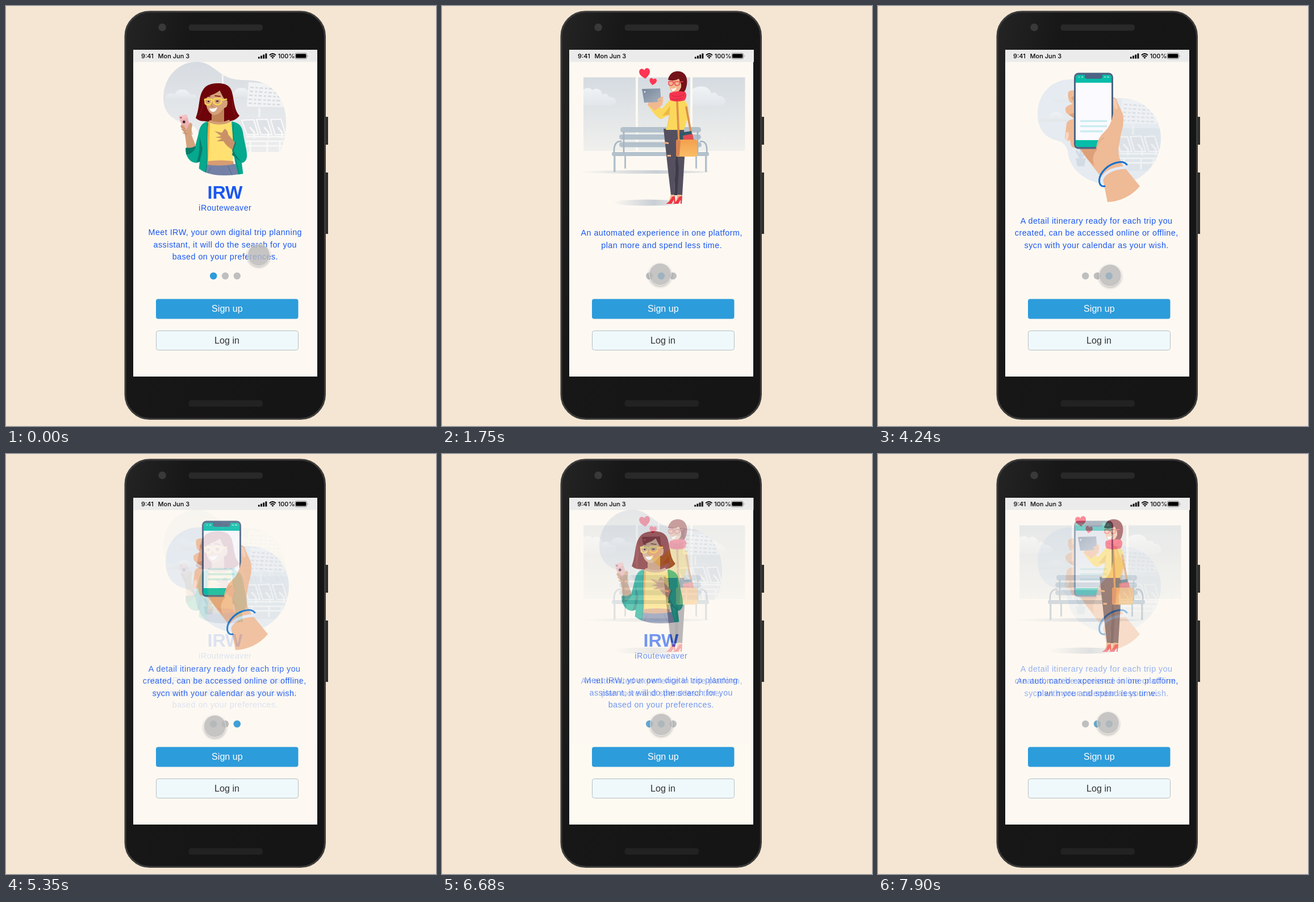
Recreate the animation shown at these times as an HTML page. Size 757x739 px, loop 8000 ms.

```html
<!DOCTYPE html>
<html lang="en">
<head>
<meta charset="utf-8">
<title>Trip planner onboarding</title>
<style>
html, body { margin: 0; width: 100%; height: 100%; overflow: hidden; background: #f5e6d3 }
svg { display: block; width: 757px; height: 739px }
text { font-family: "Liberation Sans", Arial, sans-serif; text-anchor: middle }
.copy { font-size: 14.33px; letter-spacing: .457px; fill: #1a56f0 }
.btn { font-size: 16.1px }
.bar text { font: 500 11px Inter, sans-serif; text-anchor: start }
.line { fill: none; stroke-linecap: round; stroke-linejoin: round }
#cursor { opacity: .8 }
</style>
</head>
<body>
<svg viewBox="0 0 757 739">
<defs>
  <linearGradient id="body" x2="1" y2=".35"><stop stop-color="#242424"/><stop offset=".3" stop-color="#171717"/><stop offset="1" stop-color="#151515"/></linearGradient>
  <linearGradient id="sky" x2="0" y2="1"><stop stop-color="#d6dbe1"/><stop offset=".75" stop-color="#e9ebed"/><stop offset="1" stop-color="#fbf9f3"/></linearGradient>
  <linearGradient id="pane" x2="0" y2="1"><stop stop-color="#d5dbe1"/><stop offset="1" stop-color="#f0f0ed"/></linearGradient>
  <linearGradient id="cloud" x2="0" y2="1"><stop stop-color="#f0f3f5"/><stop offset="1" stop-color="#e2e6ea"/></linearGradient>
  <linearGradient id="floor"><stop stop-color="#c9cfd5" stop-opacity="0"/><stop offset=".6" stop-color="#c9cfd5"/><stop offset="1" stop-color="#c9cfd5" stop-opacity=".3"/></linearGradient>
  <linearGradient id="tablet" x2="1" y2="1"><stop stop-color="#76879a"/><stop offset="1" stop-color="#a5b1be"/></linearGradient>
  <linearGradient id="bag" x2="0" y2="1"><stop stop-color="#f2a04e"/><stop offset="1" stop-color="#fbbd66"/></linearGradient>
  <clipPath id="blobA"><path d="M277 163C277 125 303 99 335 98C362 98 369 118 395 127C412 132 425 129 441 132C475 139 493 170 493 204C493 228 488 246 482 257H345C341 225 337 211 320 206C295 204 277 188 277 163Z"/></clipPath>
  <clipPath id="blobB"><path d="M281 190C281 152 308 129 340 129C372 129 382 166 425 162C470 162 498 195 498 232C498 280 460 315 415 315C370 315 340 290 335 262C333 240 320 238 312 236C293 230 281 215 281 190Z"/></clipPath>
  <clipPath id="bust"><path d="M270 90H500V275C450 290 415 298 382 298C360 298 345 292 335 282L270 262Z"/></clipPath>
  <path id="heart" d="M0 9C-5 5-9 2-9-3C-9-9-2-10 0-5C2-10 9-9 9-3C9 2 5 5 0 9Z" fill="#ff3553"/>
  <g id="puff"><path d="M0 0C0-8 10-12 16-7C20-20 40-18 43-7C50-9 56-5 57 0Z" fill="url(#cloud)"/></g>
  <g id="hall">
    <path d="M427 134L488 139V178L424 177Z" fill="#f2f3f4"/>
    <path class="line" d="M430 143L486 147M429 150L486 154M428 157L486 160M427 164L486 167M427 171L486 174" stroke="#d6dbe0" stroke-width="2.6" stroke-dasharray="6 3.5 4 3" style="stroke-linecap:butt"/>
    <path d="M446 179V196" stroke="#f4f5f6" stroke-width="3"/>
    <g fill="#dfe2e6" stroke="#fafafa" stroke-width="2">
      <path d="M415 201L436 200L444 226H424Z"/><path d="M441 200L460 199L468 226H449Z"/><path d="M466 200L484 199L492 226H474Z"/>
    </g>
    <path class="line" d="M424 230H492M416 238H492M414 246H490M430 214L437 222V232M455 214L462 222V232M479 214L486 222V232M430 238V256M460 238V256M482 238V256" stroke="#f8f8f7" stroke-width="3"/>
  </g>
  <g id="bar" class="bar">
    <rect x="224" y="77" width="324" height="21.5" fill="#ebebeb"/>
    <text x="238" y="91.8">9:41</text><text x="267.5" y="91.8">Mon Jun 3</text><text x="478.7" y="91.8">100%</text>
    <path d="M444 92.500v-3M448.200 92.500v-5M452.400 92.500v-7M456.600 92.500v-9" transform="translate(1.300 0)" stroke="#000" stroke-width="2.800"/>
    <path class="line" d="M463.800 86.500q5.600-5 11.200 0M465.800 89q3.600-3 7.200 0" stroke="#000" stroke-width="1.800" style="stroke-linecap:butt"/>
    <path d="M467.300 90.500q2.100-1.500 4.200 0L469.400 92.700Z"/>
    <rect x="508.700" y="82.900" width="21" height="10" rx="2.600" fill="none" stroke="#777" stroke-width=".8"/>
    <rect x="510" y="84.200" width="18.400" height="7.400" rx="1.500"/><path d="M531 86.500q1.800 1.500 0 3Z" fill="#777"/>
  </g>
  <g id="dots" fill="#bfbfbf"><circle cx="365.200" cy="475" r="6.200"/><circle cx="386" cy="475" r="6.200"/><circle cx="406.800" cy="475" r="6.200"/></g>
  <rect id="paper" x="224" y="77" width="324" height="575" fill="#fdf9f2"/>
</defs>

<rect width="757" height="739" fill="#f5e6d3"/>

<!-- handset -->
<path d="M561 195h6v49h-6ZM561 293h6v108h-6Z" fill="#2d2d2d"/>
<rect x="210" y="10" width="351.500" height="716.500" rx="43" fill="url(#body)" stroke="#3b3b3b" stroke-width="3"/>
<rect x="321.500" y="32.500" width="130.500" height="11" rx="4.500" fill="#292929"/>
<rect x="321.500" y="693.500" width="130.500" height="11.500" rx="4.500" fill="#222"/>
<circle cx="275" cy="37.500" r="6.800" fill="#393939"/>

<!-- welcome -->
<g class="page">
  <use href="#paper"/><use href="#bar"/>
  <g clip-path="url(#blobA)">
    <rect x="270" y="95" width="230" height="165" fill="url(#sky)"/>
    <use href="#puff" x="281" y="163"/><use href="#puff" x="385" y="160"/>
    <path d="M381.500 115V145" stroke="#f3f4f5" stroke-width="3"/>
    <path d="M400 196H495V257H400Z" fill="#e4e7ea" opacity=".6"/>
    <use href="#hall"/>
  </g>
  <g clip-path="url(#bust)">
    <!-- hair, neck -->
    <path d="M334 197C341 180 339 160 346 149C352 138 362 136 374 136C392 136 397 145 399 156C402 172 403 185 411 193C407 198 402 201 397 202L380 207L352 203C347 202 341 204 334 197Z" fill="#6d0409"/>
    <path d="M362 182L384 176V203L394 207L377 216L356 206L362 200Z" fill="#c08358"/>
    <!-- top, midriff, jeans -->
    <path d="M356 204C370 210 384 209 395 204L403 215L399 275H354L352 220Z" fill="#ffe070"/>
    <path d="M356 204Q375 213 395 204L393 200Q376 208 359 201Z" fill="#d39e76"/>
    <path d="M355 273Q377 270 400 273L402 281H353Z" fill="#d79c72"/>
    <path d="M352 279Q378 283 404 278L414 300H345Z" fill="#7381a6"/>
    <path d="M361 284L352 300M391 282L399 300" stroke="#56658d" fill="none"/>
    <path d="M354 205L359 204L356 272L351 280Z" fill="#f3ad45"/>
    <!-- jacket -->
    <path d="M355 203C344 206 341 213 339 224L333 247L317 251C315 262 322 275 334 276L341 274L338 300H351C357 270 351 240 356 206Z" fill="#05a98e"/>
    <path d="M397 203C409 205 415 210 417 222C420 241 425 255 424 266C423 273 418 276 415 276L418 300H410C402 275 400 257 400 240Z" fill="#05a98e"/>
    <path d="M316 250L331 244L334 249C329 258 323 262 317 261ZM341 230L346 252L341 274L335 276C342 260 340 246 341 230Z" fill="#077c6b"/>
    <path d="M400 252L398 262L415 275C407 266 402 260 400 252Z" fill="#077c6b"/>
    <path class="line" d="M355 207C351 240 358 270 350 298M400 209C399 250 405 276 411 297" stroke="#078a76" stroke-width="1.400"/>
    <!-- raised hand with handset -->
    <path d="M304 194L318 191L329 226L316 230Z" fill="#efb2b5"/>
    <path d="M304 194L318 191L320 196L306 201Z" fill="#f4c2c3"/>
    <circle cx="313.300" cy="204" r="2.400" fill="#3e2730"/><circle cx="308" cy="196.500" r="1.500" fill="#a25664"/>
    <path d="M307 211Q310 207 314 211L317 218L324 205Q330 207 327 214L326 225L334 246Q326 251 318 249L315 226Z" fill="#d5a27e"/>
    <path class="line" d="M308 212L315 216M309 217L316 221M311 223L318 225" stroke="#b97f5d"/>
    <!-- folded hand -->
    <path d="M367 220L380 223L385 216Q391 219 391 226L404 241L400 254Q387 246 383 238L371 238L380 233L368 231L379 229Z" fill="#ca9168"/>
    <path d="M404 240L421 251Q426 264 415 263L399 255Z" fill="#05a98e"/>
    <path class="line" d="M404 240L399 255" stroke="#077c6b" stroke-width="2"/>
    <!-- face -->
    <path d="M353 157C359 152 371 154 377 148C385 155 391 164 389 177L382 181C378 188 371 192 366 192C355 189 350 175 353 157Z" fill="#d5a17a"/>
    <path d="M346 174C345 158 350 147 366 143C379 140 391 146 393 165L392 183C387 178 388 167 382 160L376 148C367 158 356 155 351 165Z" fill="#6d0409"/>
    <path d="M383 168Q390 162 390 170Q390 178 384 179Z" fill="#d5a17a"/>
    <path class="line" d="M350 164H362V170Q357 177 351 172ZM366 163H379V170Q373 177 366 171ZM362 166H366M379 166L388 164" stroke="#f6d653" stroke-width="2.600"/>
    <path d="M355 168h3M370 167.500h4" stroke="#341218" stroke-width="2"/>
    <path class="line" d="M352 159L359 159M368 158L377 159" stroke="#6d0409" stroke-width="1.500"/>
    <path d="M358 180Q365 182 372 178Q369 188 363 186Q359 185 358 180Z" fill="#fff"/>
    <path class="line" d="M363 170L361 176L365 177" stroke="#b6784f"/>
    <path class="line" d="M339 193Q348 182 347 160M399 164Q398 187 406 197" stroke="#871920" stroke-width=".9"/>
  </g>
  <text x="385.500" y="339" font-size="32.250" font-weight="700" fill="#1a56f0">IRW</text>
  <g class="copy">
    <text x="385.800" y="360">iRouteweaver</text>
    <text x="385.800" y="403">Meet IRW, your own digital trip planning</text>
    <text x="385.800" y="424.500">assistant, it will do the search for you</text>
    <text x="385.800" y="446">based on your preferences.</text>
  </g>
  <use href="#dots"/><circle cx="365.200" cy="475" r="6.200" fill="#2d9cdb"/>
</g>

<!-- automated -->
<g class="page">
  <use href="#paper"/><use href="#bar" x="1"/>
  <path d="M249 125.500h92v129.500h-92ZM345 125.500h92v129.500h-92ZM441 125.500h92.500v129.500h-92.500Z" fill="url(#pane)"/>
  <path d="M249 147Q258 141 265 148C271 142 282 147 282 156Q290 151 294 160Q306 159 307 170Q300 177 285 175H249Z" fill="url(#cloud)"/>
  <path d="M441 146C455 138 471 141 474 154Q482 149 486 158Q498 157 499 170Q493 178 476 176H441Z" fill="url(#cloud)"/>
  <ellipse cx="355" cy="292" rx="116" ry="3" fill="url(#floor)"/>
  <ellipse cx="361" cy="346" rx="61" ry="5.500" fill="url(#floor)"/>
  <g fill="#b3c1cc">
    <rect x="314" y="213" width="142" height="9.500" rx="4.500"/><rect x="312" y="226" width="144" height="9" rx="4.500"/>
    <rect x="312" y="239.500" width="145" height="9" rx="4.500"/><rect x="299" y="257" width="171" height="7" rx="3"/>
    <path d="M302 264h3.500v28h-3.500ZM321 264h3v22h-3ZM446 264h3v22h-3ZM463 264h3.500v28h-3.500Z"/>
  </g>
  <path class="line" d="M303 257Q302 238 315 238M466 257Q468 238 455 238M320 222V257M450 222V257" stroke="#a5b4c0" stroke-width="2.600"/>
  <use href="#heart" transform="translate(357 118.500) rotate(-8) scale(1.050)"/>
  <use href="#heart" transform="translate(371.500 133) rotate(8) scale(.7)"/>
  <!-- legs -->
  <path d="M390 216H426L428 250L423 333H413L412 255L409 333H403L398 290Z" fill="#55505f"/>
  <path d="M412 244L417 285L414 333L409 333Z" fill="#3f3b49"/>
  <path d="M391 239l8 1v3l-8-1ZM396 262l7 0v3l-6 0Z" fill="#eeb184"/>
  <path d="M403 332h6l-1 8-9 5ZM414 332h7l-1 8-8 5Z" fill="#efb68c"/>
  <path d="M394 348Q401 345 405 336L410 334L411 348H409L408 341L404 348ZM406 348Q413 345 417 336L423 334L422 348H420L420 341L416 348Z" fill="#ef3541"/>
  <!-- torso -->
  <path d="M402 164Q416 158 428 167Q436 176 433 195L426 218H394L401 191L386 199Q378 198 362 174L371 168L387 181Z" fill="#fbd85c"/>
  <path d="M402 176L388 193L401 191L397 213Z" fill="#edb845"/>
  <path class="line" d="M414 168L417 237M430 178L440 232" stroke="#dc914b" stroke-width="3.600"/>
  <path d="M362 174L366 164L375 170L382 158L389 164L388 174L375 184Z" fill="#f2b88e"/>
  <path d="M352 146L384 145L386 169L356 170Z" fill="url(#tablet)"/><circle cx="357" cy="151" r="1.500" fill="#dce3e9"/>
  <path class="line" d="M381 165L388 161M380 170L388 166" stroke="#f2b88e" stroke-width="3.500"/>
  <!-- bag -->
  <path d="M418 223L439 220L442 239H419Z" fill="#315868"/><path d="M424 228L441 225L444 239H425Z" fill="#e24b52"/>
  <rect x="412" y="235" width="37" height="30" rx="3" fill="url(#bag)"/><path d="M414 235L420 237L418 264H414Q412 264 412 261V237Z" fill="#d98251"/>
  <!-- head -->
  <path d="M400 128C400 119 408 114 417 115C430 116 434 130 430 143Q428 153 420 154L404 138Z" fill="#74121a"/>
  <path d="M400 129Q412 129 416 124Q422 132 421 143Q416 155 407 153Q399 149 400 129Z" fill="#f2b88e"/>
  <path d="M398 130Q399 119 412 117Q424 122 422 140L417 128Q409 133 398 130Z" fill="#74121a"/>
  <path class="line" d="M399 133H407V138Q402 142 399 138ZM410 133H418V138Q413 142 410 138ZM407 135H410M418 134L424 133" stroke="#ed4954" stroke-width="1.500"/>
  <path d="M403 145Q408 147 413 143Q411 150 406 150Z" fill="#fff"/>
  <path d="M401 153Q414 148 428 151Q433 158 427 166Q413 170 402 166Q399 159 401 153Z" fill="#f5344f"/>
  <path class="line" d="M404 157Q415 163 427 155M405 164Q415 166 423 162" stroke="#cf2741"/>
  <g class="copy">
    <text x="386.700" y="404">An automated experience in one platform,</text>
    <text x="386.700" y="425.500">plan more and spend less time.</text>
  </g>
  <use href="#dots"/><circle cx="386" cy="475" r="6.200" fill="#2d9cdb"/>
</g>

<!-- itinerary -->
<g class="page">
  <use href="#paper"/><use href="#bar"/>
  <g clip-path="url(#blobB)">
    <rect x="275" y="125" width="230" height="195" fill="#e5ebf0"/>
    <use href="#puff" x="284" y="203"/><use href="#puff" x="309" y="169" opacity=".6"/>
    <path d="M400 215H500V290H400Z" fill="#dce3e9" opacity=".7"/>
    <use href="#hall" x="3" y="30" opacity=".7"/>
    <path d="M348 268H366L363 282H351Z" fill="#d2dbe3"/>
    <path class="line" d="M357 268L350 256M357 268V252M357 268L365 257" stroke="#d2dbe3" stroke-width="4"/>
  </g>
  <!-- palm and fingers -->
  <path d="M350 150Q341 146 335 151Q333 158 337 168L350 178ZM350 172Q335 172 330 180Q329 188 337 192L350 202ZM350 198Q334 199 332 207L329 232Q332 239 337 236L350 219ZM350 218Q339 222 337 232L340 246Q345 252 350 248Z" fill="#efba96"/>
  <path d="M331 223Q336 219 336 227L334 236Q329 238 330 231Z" fill="#f8d7c5"/>
  <path d="M412 160Q421 161 422 170L431 190Q434 206 428 224L424 246Q421 263 430 279L461 317Q439 343 404 345L396 305Q379 283 368 269L353 248L384 238L407 213Z" fill="#efba96"/>
  <path d="M354 248L386 252Q374 265 381 282L367 267ZM346 157L340 162L347 171ZM346 188L336 191L347 199Z" fill="#dea079"/>
  <path d="M408 167Q413 158 420 167L422 180Q412 188 410 196Z" fill="#f7cbb0"/>
  <!-- handset -->
  <rect x="345" y="117.500" width="69" height="134" rx="8" fill="#4d6584"/>
  <path d="M348 127Q348 121 354 121H405Q411 121 411 127V242Q411 248 405 248H354Q348 248 348 242Z" fill="#fbfaff"/>
  <path d="M348 135V127Q348 121 354 121H405Q411 121 411 127V135ZM348 236H411V242Q411 248 405 248H354Q348 248 348 242Z" fill="#05bda9"/>
  <path d="M364 120H395V124Q395 128 391 128H368Q364 128 364 124Z" fill="#4d6584"/>
  <path d="M353 125h2M358 125h3M398 125h3M403 125h4" stroke="#80ded2" stroke-width="2"/>
  <path class="line" d="M356 202.500H403M356 211.500H403M356 220.500H396" stroke="#cbecef" stroke-width="3.400" style="stroke-linecap:butt"/>
  <path d="M414 190Q410 211 399 221Q387 231 384 249L388 258L420 248L427 205L415 174Z" fill="#efba96"/>
  <path d="M384 251Q389 235 398 232" class="line" stroke="#dea079" stroke-width="1.200"/>
  <!-- bracelets -->
  <path class="line" d="M392 312Q396 286 437 284" stroke="#e2eaf8" stroke-width="5"/>
  <path class="line" d="M399 317C388 319 386 304 396 291C407 277 430 269 438 279" stroke="#1570cc" stroke-width="3"/>
  <g class="copy">
    <text x="384.700" y="382.500">A detail itinerary ready for each trip you</text>
    <text x="384.700" y="404">created, can be accessed online or offline,</text>
    <text x="384.700" y="425.500">sycn with your calendar as your wish.</text>
  </g>
  <use href="#dots"/><circle cx="406.800" cy="475" r="6.200" fill="#2d9cdb"/>
</g>

<rect x="264" y="515.500" width="250.500" height="35" rx="4" fill="#2d9cdb"/>
<text class="btn" x="389.400" y="538" fill="#fff">Sign up</text>
<rect x="264.500" y="571.500" width="250" height="34" rx="4" fill="#eff9fc" stroke="#b7bec1"/>
<text class="btn" x="389" y="594" fill="#333">Log in</text>

<g id="cursor">
  <circle r="19.500" fill="#b9b9b9" stroke="#fff" stroke-width=".8" style="filter:drop-shadow(0 2px 2px #0005)"/>
  <circle id="tap" r="14" fill="#d9da4c"/>
</g>
</svg>
<script>
const LOOP = 8000, FADE = 500;
const pages = [...document.querySelectorAll('.page')];
const cursor = document.getElementById('cursor'), tap = document.getElementById('tap');
// start, from page, to page
const fades = [[1225, 0, 1], [3310, 1, 2], [5310, 2, 0], [6555, 0, 1], [7755, 1, 2]];
// time, x, y
const path = [
  [0, 445, 438], [50, 445, 438], [360, 382, 479], [480, 382, 479], [780, 384, 472],
  [2570, 384, 472], [2730, 415, 473], [4170, 415, 473], [4240, 409, 474], [4360, 367, 479],
  [5750, 368, 479], [5900, 386, 476], [7150, 386, 476], [7310, 405, 473], [LOOP, 405, 473]
];
const easeOut = x => 1 - (1 - x) ** 1.7;

function showPages(t) {
  let from = 0, to = 0, k = 1;
  for (const [start, a, b] of fades)
    if (t >= start) { from = a; to = b; k = easeOut(Math.min(1, (t - start) / FADE)); }
  if (k === 1) from = to;
  // the lower page stays opaque, the upper one carries the dissolve
  const low = Math.min(from, to), high = Math.max(from, to);
  pages.forEach((p, i) => {
    const o = i === low ? 1 : i === high ? (high === to ? k : 1 - k) : 0;
    p.style.opacity = o;
    p.style.display = o ? '' : 'none';
  });
}

function moveCursor(t) {
  const i = path.findIndex(p => p[0] > t);
  const [t0, x0, y0] = path[i - 1], [t1, x1, y1] = path[i];
  const k = (t - t0) / (t1 - t0);
  cursor.setAttribute('transform', `translate(${x0 + (x1 - x0) * k} ${y0 + (y1 - y0) * k})`);
  const down = fades.some(([s]) => t >= s - 150 && t < s + 15);
  tap.style.display = down ? '' : 'none';
}

const start = performance.now();
function draw(now) {
  const t = Math.max(0, now - start) % LOOP;
  showPages(t);
  moveCursor(t);
  requestAnimationFrame(draw);
}
draw(start);
</script>
</body>
</html>
```
